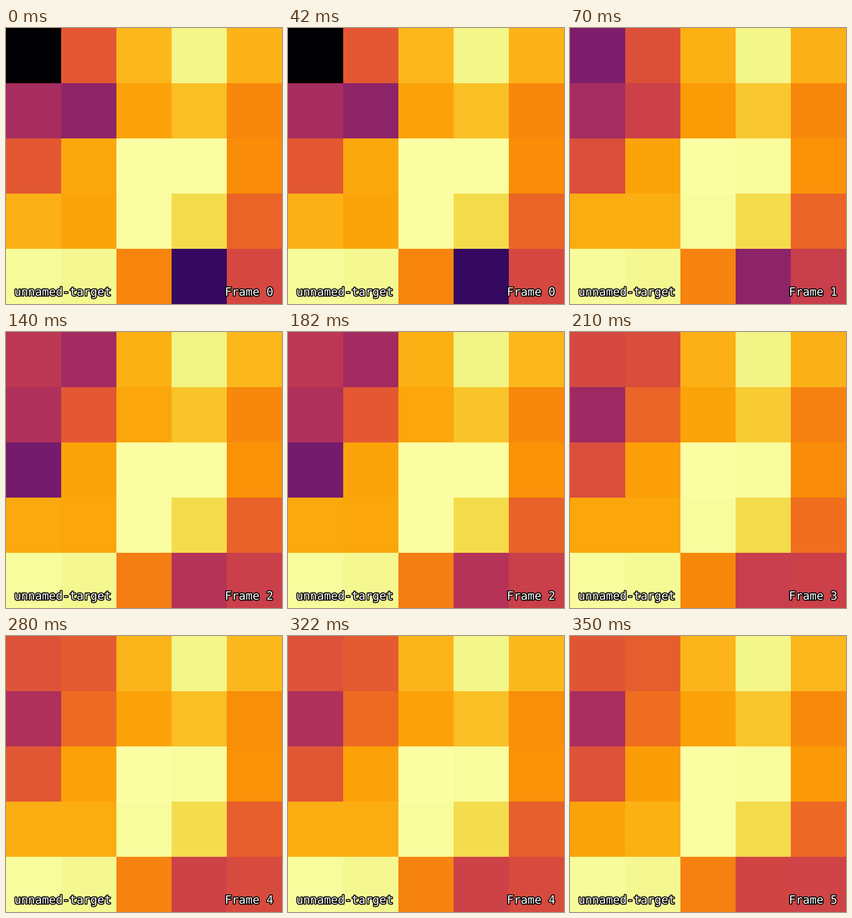
A matplotlib script that plays this animation: 440 by 440 pixels, repeating every 420 ms.

```python
import matplotlib.pyplot as plt
import numpy as np
from matplotlib.animation import FuncAnimation
from matplotlib.patheffects import withStroke

DPI, INCHES = 110, 4
FRAMES, STEP_MS = 6, 70
MARGIN = 0.03

# Settled heat of each cell, 0-255.
LEVELS = np.array([
    [160, 160, 211, 247, 214],
    [115, 174, 202, 220, 188],
    [158, 202, 255, 253, 194],
    [206, 207, 253, 232, 170],
    [252, 250, 186, 145, 139],
])
COLD_STARTS = {(0, 0): 160, (1, 1): 75, (4, 3): 102}  # cell: missing heat
DIPS = {(2, 0): 78, (0, 1): 50}                       # cell: depth of dip
DIP_FRAME = 2
JITTER = np.random.default_rng(4).normal(0, 0.04, (FRAMES, *LEVELS.shape))


def heat_at(frame):
    # Colder cells flicker more.
    heat = LEVELS + JITTER[frame] * (255 - LEVELS)
    for cell, depth in COLD_STARTS.items():
        heat[cell] = LEVELS[cell] - depth * np.exp(-0.8 * frame)
    for cell, depth in DIPS.items():
        heat[cell] -= depth * np.exp(-2 * (frame - DIP_FRAME) ** 2)
    return heat


def label(x, text, align):
    return ax.text(x, MARGIN, text, transform=ax.transAxes, ha=align,
                   va="baseline", family="DejaVu Sans Mono", fontsize=12,
                   color="white",
                   path_effects=[withStroke(linewidth=2, foreground="black")])


fig = plt.figure(figsize=(INCHES, INCHES), dpi=DPI)
ax = fig.add_axes([0, 0, 1, 1])
ax.axis("off")
image = ax.imshow(heat_at(0), cmap="inferno", vmin=0, vmax=255,
                  interpolation="nearest")
label(MARGIN, "unnamed-target", "left")
counter = label(1 - MARGIN, "Frame 0", "right")


def update(frame):
    image.set_data(heat_at(frame))
    counter.set_text(f"Frame {frame}")
    return image, counter


anim = FuncAnimation(fig, update, frames=FRAMES, interval=STEP_MS, repeat=True)
plt.show()
```
